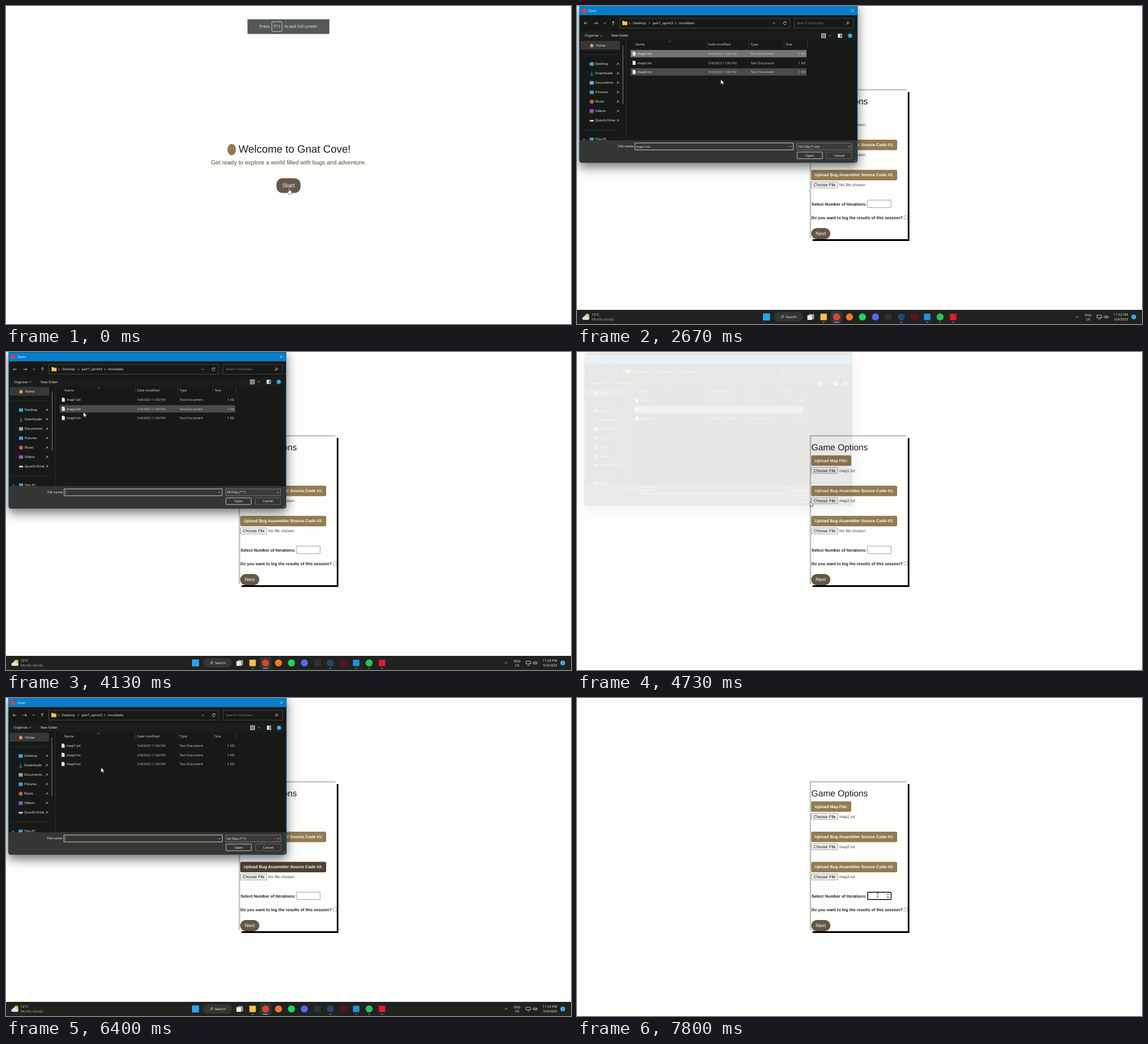
Animation, 960 px wide and 540 px high, one loop 8 s. Source, as an HTML page:

```html
<!DOCTYPE html>
<html lang="en">
<head>
<meta charset="utf-8">
<title>Game options</title>
<style>
  html, body { margin: 0; width: 100%; height: 100%; overflow: hidden; background: #fdfefc; }
  svg { display: block; width: 100vw; height: 100vh; }
  text { white-space: pre; text-rendering: geometricPrecision; }
  .page { font: 7px "Liberation Sans", Arial, sans-serif; fill: #1c1c1e; }
  .bold { font-weight: 700; }
  .ui { font: 5.7px "Open Sans", "Noto Sans", sans-serif; fill: #f2f2f0; }
  .dim { fill: #a9aaa8; }
  .mid { text-anchor: middle; }
  .end { text-anchor: end; }
  .line { fill: none; stroke: #d8d8d6; stroke-width: .8; }
  #dialog { transform-origin: 240px 133px; }
  #window { filter: drop-shadow(0 7px 9px rgba(0, 0, 0, .55)); }
</style>
</head>
<body>
<svg id="stage" viewBox="0 0 960 540"></svg>
<script>
const LOOP = 8000;
const ROWS = [81, 96.5, 112];
const UPLOADS = [
  { y: 175.5, width: 68, label: 'Upload Map File:' },
  { y: 227, width: 146, label: 'Upload Bug Assembler Source Code #1:' },
  { y: 278.3, width: 146, label: 'Upload Bug Assembler Source Code #2:' }
];
// Each file picker: click, taskbar shown, dialog opens, row picked, dialog closes.
const PICKERS = [
  { click: 1300, bar: 1500, open: 1640, pick: 2330, close: 2900, filter: 'TXT File (*.txt)' },
  { click: 3560, bar: 3750, open: 3930, pick: 4300, close: 4640, filter: 'All Files (*.*)' },
  { click: 5600, bar: 5700, open: 5870, pick: 6560, close: 6980, filter: 'All Files (*.*)' }
];
const POINTER = [
  [0, 481, 309.5], [560, 481, 309.5], [1130, 416, 207], [1650, 416, 207],
  [2200, 135, 82], [2420, 150, 84], [2670, 243.5, 124], [2860, 396, 254],
  [3000, 396, 254], [3450, 418, 254], [3560, 418, 254], [3800, 131.5, 102],
  [4300, 131.5, 102], [4580, 396, 254], [4750, 396, 254], [5250, 415, 294],
  [5700, 415, 294], [6250, 200, 135], [6400, 161.5, 118], [6520, 140, 112],
  [6600, 140, 112], [6920, 396, 254], [7100, 396, 254], [7530, 511, 334.5], [8000, 511, 334.5]
];

const text = (x, y, content, cls = '', extra = '') =>
  `<text x="${x}" y="${y}" class="${cls}" ${extra}>${content}</text>`;
const box = (x, y, w, h, fill, extra = '') =>
  `<rect x="${x}" y="${y}" width="${w}" height="${h}" fill="${fill}" ${extra}/>`;
const dot = (x, y, r, fill, extra = '') =>
  `<circle cx="${x}" cy="${y}" r="${r}" fill="${fill}" ${extra}/>`;
const line = (d, extra = '') => `<path class="line" d="${d}" ${extra}/>`;
const chevron = (x, y, size = 1.8) => line(`M${x - size} ${y - size / 2}l${size} ${size} ${size} ${-size}`);
const group = (id, content, extra = '') => `<g id="${id}" ${extra}>${content}</g>`;
const loupe = (x, y) => line(`M${x - 2.5} ${y + 2.5}l2-2`) + dot(x + .7, y - .7, 1.7, 'none', 'class="line"');
const folder = (x, y) => `<path d="M${x} ${y}h3l1 1.2h4.5v6H${x}Z" fill="#f5c64a"/>`;

function welcome() {
  return `<ellipse cx="383.5" cy="243.8" rx="7.3" ry="9.7" fill="#927b51"/>`
    + text(395, 249, 'Welcome to Gnat Cove!', '', 'font-size="18"')
    + text(480, 269, 'Get ready to explore a world filled with bugs and adventure.', 'mid', 'font-size="10" fill="#5c4a38"')
    + box(459.5, 292.5, 41, 25, '#665849', 'rx="10"')
    + text(480, 308, 'Start', 'mid', 'font-size="10" fill="#f4f1ec"');
}

function upload({ y, width, label }, i) {
  return box(398, y, width, 17.7, '#937c52', `rx="2.5" id="label${i}"`)
    + text(404, y + 11, label, 'bold', 'fill="#fff"')
    + box(398.4, y + 20.3, 44.8, 10.4, '#efefef', `rx="1.3" stroke="#767676" stroke-width=".6" id="choose${i}"`)
    + text(420.8, y + 28, 'Choose File', 'mid', 'fill="#111"')
    + text(445.5, y + 28, '', '', `id="status${i}" fill="#474749"`);
}

function form() {
  return box(400.3, 146, 164.5, 253, '#000') + box(395.3, 141, 164.5, 253, '#c6c6c6')
    + box(398, 143.6, 164, 252.4, '#fdfefc')
    + text(398.3, 167, 'Game Options', '', 'font-size="14.9"')
    + UPLOADS.map(upload).join('')
    + text(398.5, 338.5, 'Select Number of Iterations:', 'bold')
    + box(493.7, 329.7, 40, 12.6, '#fff', 'rx="1" stroke="#767676" stroke-width=".7" id="count"')
    + group('focus', `<path d="M526.3 334.3h4l-2-2.3ZM526.3 337.6h4l-2 2.3Z" fill="#444"/>`
      + line('M496.3 331.8v8', 'stroke="#222" style="stroke:#555;stroke-width:.5"'))
    + text(398.3, 361.8, 'Do you want to log the results of this session?', 'bold')
    + box(555.8, 356, 6, 6, '#fff', 'rx="1" stroke="#767676" stroke-width=".6"')
    + box(398, 377, 32.5, 19, '#655846', 'rx="9.5"')
    + text(414.2, 389.2, 'Next', 'mid', 'font-size="8.3" fill="#fff"');
}

function toast() {
  return box(410.3, 22.5, 139.2, 25, '#555859')
    + box(451.7, 26.7, 17.2, 16.6, 'none', 'rx="1.5" stroke="#dededc" stroke-width=".8"')
    + [[430.5, 'Press'], [455, 'F11'], [473, 'to exit full screen']]
      .map(([x, word]) => text(x, 37.4, word, 'ui', 'style="font-size:7px"')).join('');
}

function sidebar() {
  const places = [['Desktop', '#35a4dc'], ['Downloads', '#43b795'], ['Documents', '#8ba5bd'], ['Pictures', '#3b9bdf'],
    ['Music', '#d0526a'], ['Videos', '#8d55cf'], ['Quorbi Drive', '#d5d5d3']];
  const items = places.map(([name, color], i) => {
    const y = 98.4 + 16 * i;
    const icon = name === 'Downloads' ? line(`M25 ${y - 3}v5m-2-2l2 2 2-2m-4.500 3.600h5`, `style="stroke:${color}"`)
      : name === 'Music' ? dot(25, y, 3.4, color)
      : i === 6 ? box(21.5, y - 1, 7, 2.8, color, 'rx="1"')
      : box(21.5, y - 2.8, 7, 5.8, color, 'rx=".7"');
    return icon + text(31, y + 2, name) + line(`M67.300 ${y + 2}l2-2m-1-1.500l2.500 2.500m-1.800-3l2.500 2.300`);
  });
  return box(6, 59, 67, 15, '#373835', 'rx="1.5"')
    + `<path d="M21.500 67l3.500-3.500 3.500 3.500h-1v3h-5v-3Z" fill="#e89a55"/>` + text(32, 69, 'Home')
    + items.join('')
    + line('M8 82.500h61M8 210.700h61M83.500 58v170', 'style="stroke:#3a3b39;stroke-width:.6"')
    + line('M78 67v100', 'style="stroke:#9a9b99"')
    + group('pc', chevron(12, 226.5) + box(21.5, 223.5, 7, 4.5, '#35a4dc') + text(31, 228.3, 'This PC'), 'clip-path="url(#pane)"');
}

function fileList() {
  const heads = [[99, 'Name'], [223, 'Date modified'], [295, 'Type'], [355, 'Size']];
  return heads.map(([x, name]) => text(x, 67, name, '', 'fill="#d6d6d4"')).join('')
    + line('M220 58v13M292 58v13M352 58v13M391.500 58v13', 'style="stroke:#4a4b49;stroke-width:.6"')
    + line('M155.500 61l2-1.600 2 1.600', 'style="stroke-width:.5"')
    + ROWS.map((y, i) => box(91, y - 6.3, 299, 12.5, 'none', `id="row${i}"`)
      + `<path d="M94.500 ${y - 3.5}h3.500l1.600 1.600v5.400h-5.100Z" fill="#e8e8e6"/>`
      + text(103, y + 2, `map${i + 1}.txt`)
      + text(223, y + 2, '5/4/2023 11:06 PM', '', 'style="font-size:5.5px" fill="#c9cac8"')
      + text(295, y + 2, 'Text Document', '', 'fill="#c9cac8"')
      + text(388, y + 2, '1 KB', 'end', 'fill="#c9cac8"')).join('');
}

function dialog() {
  const frame = 'stroke="#555653" stroke-width=".7"';
  const bright = 'stroke="#e4e4e2" stroke-width=".8"';
  const crumbs = [[95, 'Desktop'], [128.5, 'pair1_sprint3'], [173, 'mockdata']];
  const windowBox = box(4, -4, 472.5, 270, '#171916', 'rx="4" stroke="#0b72ba" stroke-width=".8"');
  return group('window', windowBox)
    + box(4, 0, 472.5, 15.5, '#087ecb')
    + dot(12, 8, 3.7, '#db4437') + text(19, 10, 'Open')
    + line('M465.800 5.500l4.500 4.500m0-4.500l-4.500 4.500')
    + line('M17.500 29.200h-5.500m2.300-2.300l-2.300 2.300 2.300 2.300M29 29.200h6m-2.300-2.300l2.300 2.300-2.300 2.300M61.500 32v-6m-2.300 2.300l2.300-2.300 2.300 2.300')
    + chevron(47, 29) + chevron(334.5, 29.3)
    + box(72.5, 21, 289, 16.5, 'none', frame) + box(369, 21, 101, 16.5, 'none', frame)
    + folder(77, 25.3)
    + crumbs.map(([x, name]) => line(`M${x - 6.3} 27.600l1.600 1.600-1.600 1.600`) + text(x, 31, name)).join('')
    + `<path class="line" d="M354.800 27.500a2.500 2.500 0 1 0 .5 2.500m-.3-4v2h-2"/>`
    + text(373.5, 31, 'Search mockdata', 'dim', 'style="fill:#80817f"') + loupe(459.5, 29.2)
    + box(4.4, 43, 471.7, 15, '#1b1d1a')
    + text(13, 52.3, 'Organize') + chevron(41, 50.5, 1.5) + text(58.5, 52.3, 'New folder')
    + box(415.5, 47, 7, 7, '#777875', bright) + chevron(430, 50.5, 1.5)
    + box(443.3, 47, 7, 7, '#e5e5e3') + box(447, 48, 2.5, 5, '#087ecb')
    + dot(464, 50.5, 3.8, '#2a9be0') + text(464, 52.6, '?', 'mid')
    + sidebar() + fileList()
    + `<path d="M4.400 228h471.700v34a4 4 0 0 1-4 4H8.400a4 4 0 0 1-4-4Z" fill="#353633"/>`
    + text(97, 240.3, 'File name:', 'end')
    + box(98.5, 232.7, 269, 11.6, '#353633', bright) + text(100.5, 240.8, '', '', 'id="fileName"')
    + line('M101 234.500v7.500', 'id="caret" style="stroke-width:.5"') + chevron(362.8, 238.7, 1.6)
    + box(373.5, 232.7, 93.5, 11.6, '#3b3c39', 'stroke="#8b8c8a" stroke-width=".7"')
    + text(375.5, 240.6, '', '', 'id="filter"') + chevron(462.8, 238.7, 1.6)
    + box(374, 248, 43, 11.3, '#343532', `rx="1" ${bright}`) + text(395.5, 255.6, 'Open', 'mid')
    + box(424, 248, 43, 11.3, '#343532', 'rx="1" stroke="#777875" stroke-width=".7"') + text(445.5, 255.6, 'Cancel', 'mid')
    + line('M471 264.500l3.500-3.500m-1.300 3.500l1.300-1.300', 'style="stroke:#999"');
}

function taskbar() {
  const apps = [['square', 419, '#f3c24a'], ['circle', 441, '#db4437'], ['circle', 463, '#f0782b'], ['circle', 485, '#1ed760'],
    ['circle', 507, '#5865f2'], ['square', 529, '#303133'], ['circle', 551, '#24466b'], ['square', 573, '#5c0f22'],
    ['square', 595, '#2490d8'], ['circle', 617, '#2cc25c'], ['square', 639, '#e01b2c']];
  const running = [419, 551, 595, 617, 639];
  return box(0, 516, 960, 24, '#202220')
    + dot(17.5, 526, 3.6, '#f5b83d') + `<path d="M11 533a2.700 2.700 0 0 1 .5-5.300 3.500 3.500 0 0 1 6.500 0 2.700 2.700 0 0 1 1 5.300Z" fill="#d7e1ea"/>`
    + text(25, 526.3, '12°C') + text(25, 534, 'Mostly cloudy', 'dim', 'style="font-size:5.9px"')
    + box(316, 522, 12, 12, '#29a3e8', 'rx="1"')
    + box(335, 520, 48.5, 16, '#343634', 'rx="8"') + loupe(349, 528) + text(355, 530.2, 'Search')
    + box(394, 523, 9, 9, '#8b8c8b') + box(391.5, 525, 8, 8, '#ececea')
    + box(431.5, 518, 19, 20, '#343634', 'rx="2"')
    + apps.map(([kind, x, fill]) => kind === 'circle' ? dot(x, 528, 6, fill) : box(x - 5.5, 522.5, 11, 11, fill, 'rx="1"')).join('')
    + running.map(x => box(x - 1.5, 536.6, 3, 1.2, '#a0a19f', 'rx=".6"')).join('')
    + box(436.5, 536.6, 9, 1.3, '#4cb4ee', 'rx=".6"')
    + line('M847.500 529l2.300-2.300 2.300 2.300')
    + text(868.5, 526.5, 'ENG', 'mid') + text(868.5, 534.3, 'US', 'mid')
    + line('M883.500 525h7.500v4.500h-7.500ZM886 532h3.500m1.500-3h1.500M895.500 527h1.500l2-1.800v5.600l-2-1.800h-1.500Zm5 0q1 1 0 2.200m1-3.700q2.500 2.500 0 5.200')
    + text(936.5, 526.3, '11:32 PM', 'end') + text(936.5, 534.2, '5/4/2023', 'end')
    + dot(946, 528, 4, '#46aeea') + text(946, 530, '1', 'mid', 'style="font-size:5px;fill:#15222b"');
}

function pointers() {
  const outline = 'fill="#fff" stroke="#222" stroke-width=".6" stroke-linejoin="round"';
  return group('arrow', `<path d="M0 0v8.300l1.900-1.700 1.300 2.900 1.400-.6-1.300-2.800h2.700Z" ${outline}/>`)
    + group('busy', dot(7, 1, 2.8, '#bfe4f7', 'stroke="#2388c9" stroke-width="1.9"'))
    + group('hand', `<path d="M-.8 5.500V.4q.8-1 1.600 0v3.200q2.600 0 3.600 1v3q0 1.600-.9 2.900h-3.700l-2.800-3.700q0-1.200 1-.8Z" ${outline}/>`)
    + group('beam', line('M-1.500-3.500h3m-1.500 0v7m-1.500 0h3', 'style="stroke:#222;stroke-width:.7"'));
}

document.getElementById('stage').innerHTML =
  '<defs><clipPath id="pane"><path d="M4 58h80v170H4Z"/></clipPath></defs>'
  + box(0, 0, 960, 540, '#fdfefc')
  + group('welcome', welcome(), 'class="page"') + group('form', form(), 'class="page"')
  + group('toast', toast()) + group('taskbar', taskbar(), 'class="ui"')
  + group('dialog', dialog(), 'class="ui"') + group('pointer', pointers());

const el = id => document.getElementById(id);
const show = (id, on) => { el(id).style.display = on ? '' : 'none'; };
const clamp = v => Math.min(1, Math.max(0, v));

function pointerAt(time) {
  const i = Math.max(1, POINTER.findIndex(key => key[0] >= time));
  const [t0, x0, y0] = POINTER[i - 1];
  const [t1, x1, y1] = POINTER[i];
  const p = clamp((time - t0) / (t1 - t0));
  return [x0 + (x1 - x0) * p, y0 + (y1 - y0) * p];
}

function renderForm(t) {
  // The page keeps its hover state while a picker covers it.
  const picker = PICKERS.find(p => t >= p.click && t < p.close);
  const [x, y] = pointerAt(picker ? picker.click : t);
  UPLOADS.forEach((u, i) => {
    const onLabel = x >= 398 && x < 398 + u.width && y >= u.y && y < u.y + 17.7;
    const onButton = x >= 398 && x < 443 && y >= u.y + 19.5 && y < u.y + 32;
    el('label' + i).setAttribute('fill', onLabel ? '#4e4134' : '#937c52');
    el('choose' + i).setAttribute('fill', onButton ? '#dfe0e0' : '#efefef');
    el('choose' + i).setAttribute('stroke', onButton ? '#333' : '#767676');
    el('status' + i).textContent = t >= PICKERS[i].close ? `map${i + 1}.txt` : 'No file chosen';
  });
  const focused = t >= 7660;
  show('focus', focused);
  el('count').setAttribute('stroke', focused ? '#101010' : '#767676');
  el('count').setAttribute('stroke-width', focused ? 1.4 : .7);
}

function renderDialog(t) {
  const index = PICKERS.findIndex(p => t >= p.open && t < p.close + 100);
  show('dialog', index >= 0);
  show('taskbar', PICKERS.some(p => t >= p.bar && t < p.close + 30));
  if (index < 0) return;
  const { open, pick, close, filter } = PICKERS[index];
  const growing = (1 - clamp((t - open) / 260)) ** 2;
  const leaving = clamp((t - close) / 100);
  el('dialog').style.opacity = clamp((t - open) / 120) * (1 - leaving);
  el('dialog').style.transform = `scale(${1 - .05 * growing - .04 * leaving})`;
  const picked = t >= pick;
  const [x, y] = pointerAt(t - 60);
  ROWS.forEach((rowY, i) => {
    const hovered = x > 91 && x < 390 && Math.abs(y - rowY) < 6.3;
    el('row' + i).setAttribute('fill', picked && i === index ? '#747572' : hovered ? '#4a4b49' : 'none');
  });
  el('fileName').textContent = picked ? `map${index + 1}.txt` : '';
  el('filter').textContent = filter;
  show('caret', !picked);
}

function render(t) {
  const started = t >= 470;
  show('welcome', !started);
  show('form', started);
  el('toast').style.opacity = clamp((1650 - t) / 500);
  renderForm(t);
  renderDialog(t);
  const [x, y] = pointerAt(t);
  const typing = t > 7440;
  el('pointer').setAttribute('transform', `translate(${x} ${y})`);
  show('hand', !started);
  show('arrow', started && !typing);
  show('beam', typing);
  show('busy', PICKERS.some(p => t >= p.click && t < p.open) && t < 2000);
}

const start = performance.now();
function tick() {
  render((performance.now() - start) % LOOP);
  requestAnimationFrame(tick);
}
tick();
</script>
</body>
</html>
```
